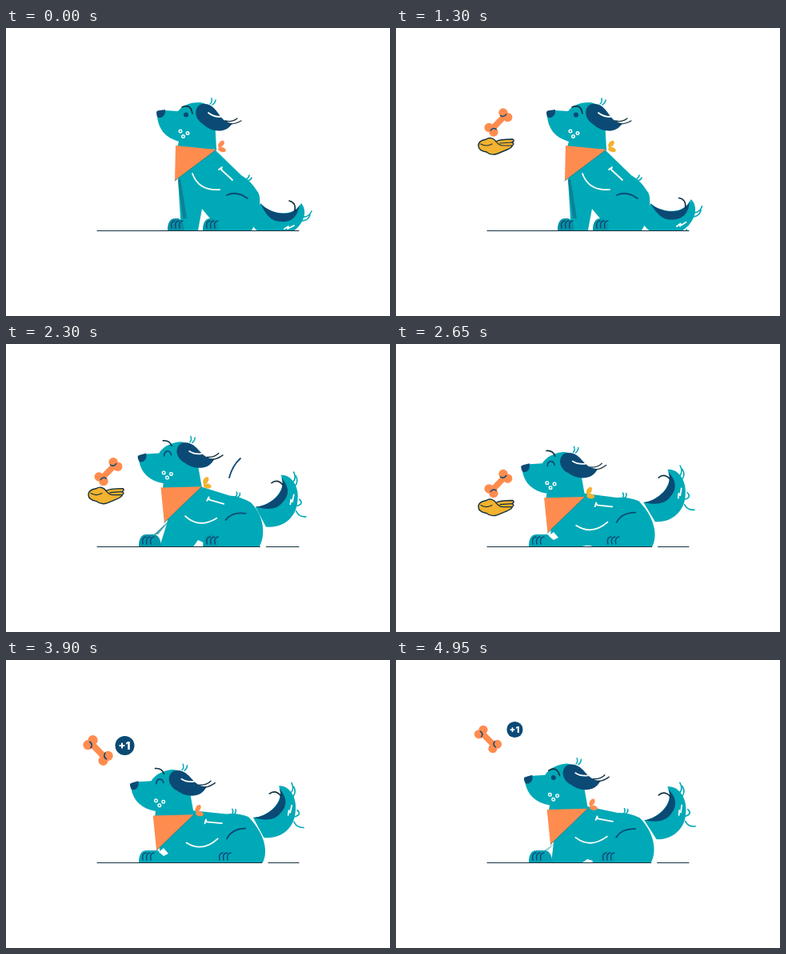
These frames come from a looping animation (480 px wide and 360 px high, 5 s). An HTML page with a canvas:

```html
<!DOCTYPE html>
<html lang="en">
<head>
<meta charset="utf-8">
<title>Dog and treat</title>
<style>
html, body { margin: 0; width: 100%; height: 100%; overflow: hidden; background: #fff; }
canvas { display: block; width: 480px; height: 360px; }
</style>
</head>
<body>
<canvas id="stage" width="480" height="360"></canvas>
<script>
const ctx = document.getElementById('stage').getContext('2d');
const LOOP = 5000, STEP = 50, GROUND = 253.5, DEG = Math.PI / 180;
const TEAL = '#00a9b7', SHADE = '#0b8197', NAVY = '#0b4a75', INK = '#12303f';
const ORANGE = '#ff8c4f', YELLOW = '#f3b22f', WHITE = '#fff';

const mix = (a, b, k) => a + (b - a) * k;
const mixPoint = (p, q, k) => [mix(p[0], q[0], k), mix(p[1], q[1], k)];
const span = (t, a, b) => Math.max(0, Math.min(1, (t - a) / (b - a)));
const smooth = k => k * k * (3 - 2 * k);
const backOut = k => 1 + 2.7 * (k - 1) ** 3 + 1.7 * (k - 1) ** 2;
const wave = (t, period) => (1 - Math.cos(t / period * 2 * Math.PI)) / 2;

function fill(color, shape) {
  ctx.fillStyle = color;
  ctx.fill(typeof shape === 'string' ? new Path2D(shape) : shape);
}

function stroke(color, width, shape) {
  ctx.strokeStyle = color;
  ctx.lineWidth = width;
  ctx.stroke(typeof shape === 'string' ? new Path2D(shape) : shape);
}

function ellipse(x, y, rx, ry = rx, angle = 0) {
  const path = new Path2D();
  path.ellipse(x, y, rx, ry, angle, 0, 2 * Math.PI);
  return path;
}

function polygon(points) {
  return new Path2D('M' + points.join('L') + 'Z');
}

function placed([x, y], angle, scale, draw) {
  ctx.save();
  ctx.translate(x, y);
  ctx.rotate(angle);
  ctx.scale(scale, scale);
  draw();
  ctx.restore();
}

// Where a point given relative to a rotated joint lands on the stage.
function jointPoint({ at, angle }, x, y) {
  const c = Math.cos(angle), s = Math.sin(angle);
  return [at[0] + x * c - y * s, at[1] + x * s + y * c];
}

// 0 = sitting, 1 = lying down.
function crouchAt(t) {
  return 1 - (1 - span(t, 1600, 2750)) ** 1.3 - .15 * span(t, 4400, 4950);
}

function poseAt(t) {
  const low = crouchAt(t);
  const sitWag = t < 1500 ? -10 * wave(t, 750) : 0;
  const lieWag = 6 * wave(t - 3050, 567) * span(t, 2300, 2750) * (1 - span(t, 4400, 4950));
  return {
    low,
    foot: mix(202, 166, smooth(span(low, .1, .65))),
    head: { at: mixPoint([193, 107], [160, 157], low), angle: -7 * Math.min(1, low * 4) * DEG },
    torso: { at: mixPoint([314, 204], [303, 196], low), angle: -38 * low * DEG },
    tail: {
      at: mixPoint([318, 219], [309, 197], low),
      angle: (-57 * Math.sin(low * Math.PI / 2) + sitWag + lieWag) * DEG
    }
  };
}

function drawTail({ tail }) {
  ctx.save();
  ctx.beginPath();
  ctx.rect(0, 0, 480, GROUND);
  ctx.clip();
  placed(tail.at, tail.angle, 1, () => {
    fill(TEAL, 'M0 0C11 13 40 20 51 0C60 10 54 28 38 37C22 48 0 44-11 26Z');
    fill(NAVY, 'M0 0C11 13 40 20 49 2C46 20 36 24 25 23C14 23 6 14 0 0Z');
    stroke(INK, 1.6, 'M43 10Q45-1 36-3');
    stroke(TEAL, 1.6, 'M53 17Q60 18 64 10M52 22Q59 22 62 15M28 43Q24 50 30 57M34 40Q41 45 42 37');
    stroke(WHITE, 1.8, 'M30 32L35 29L34 32L42 28');
  });
  ctx.restore();
}

function drawPaw(x, width, tone) {
  const paw = new Path2D(`M${x} 253C${x} 242 ${x + 4} 238 ${x + 10} 238H${x + width - 6}q7 2 8 15Z`);
  fill(TEAL, paw);
  ctx.globalAlpha = tone;
  fill(SHADE, paw);
  ctx.globalAlpha = 1;
  for (let toe = 5; toe < 16; toe += 5) stroke(NAVY, 1.5, `M${x + toe} 250q-2-8 4-9`);
}

function drawBody({ low, foot, head, torso }) {
  const scarfTip = jointPoint(head, 18, 83);
  const hip = jointPoint(torso, 0, 0);
  const back = jointPoint(torso, -20, -20);
  const gapTop = mix(226, 253, low);
  const outline = new Path2D('M' + [
    jointPoint(head, 30, 42),
    [scarfTip[0] + 4, scarfTip[1]],
    [foot + mix(17, 30, low), 253],
    [mix(240, 232, low), 253],
    [mix(245, 238, low), gapTop],
    [mix(255, 244, low), mix(238, 253, low)],
    [mix(255, 244, low), 253],
    [mix(307, 321, low), 253]
  ].join('L'));
  outline.bezierCurveTo(mix(314, 326, low), 244, mix(322, 328, low), mix(212, 222, low), ...hip);
  outline.quadraticCurveTo(...jointPoint(torso, -8, -13), ...back);
  outline.lineTo(...jointPoint(torso, -53, -52));
  outline.closePath();
  fill(TEAL, outline);

  const upright = 1 - span(low, .6, 1);
  ctx.globalAlpha = upright;
  fill(SHADE, polygon([
    [scarfTip[0] + 4, scarfTip[1]],
    [scarfTip[0] + 7, scarfTip[1] - 2],
    [foot + 24, 238], [foot + 19, 238]
  ]));
  ctx.globalAlpha = 1;
  drawPaw(foot, mix(19, 29, low), upright * .6);
  drawPaw(246 + 16 * span(low, .7, 1), 18, upright * .4);
  if (low > .9) fill(WHITE, 'M191 240L197 235L203 242L197 245Z');

  placed(torso.at, torso.angle, 1, () => {
    stroke(WHITE, 1.8, 'M-81-22Q-73 0-47-2M-48-27L-44-30L-45-27L-31-14');
    stroke(NAVY, 1.8, 'M-38 5Q-26-1-12 9');
    stroke(TEAL, 1.6, 'M-20-16Q-11-13-10-20M-18-14Q-8-12-7-17');
  });
}

function drawScarf(knotColor) {
  fill(ORANGE, 'M19 40L70 45L18 84Z');
  stroke(SHADE, .8, 'M70 45L18 84');
  fill(knotColor, ellipse(76, 38, 5, 3, -.9));
  fill(knotColor, ellipse(77, 45, 5, 3, .3));
}

function drawHead({ head }, happy, knotColor) {
  placed(head.at, head.angle, 1, () => {
    fill(TEAL, 'M-4-2Q-3-4 6-4L22-3C28-11 39-14 48-14C60-14 66-4 68 7L70 45L21 42L23 35C6 30-3 19-4 3Z');
    fill(NAVY, 'M-5-1Q-5-4-1-4L6-5Q7 2 1 5L-3 5Q-5 3-5-1Z');
    stroke(TEAL, 1.5, 'M62-12Q65-14 64-19M65-11Q69-14 69-17');
    fill(NAVY, 'M48-10C42-5 43 7 53 13C63 23 82 26 90 12C75 11 73-4 63-10C57-13 51-13 48-10Z');
    stroke(WHITE, 1.8, 'M60-1Q66 4 75 4');
    stroke(INK, 1.3, 'M87 13Q94 13 101 9M81 9Q90 11 96 6');
    if (happy) {
      stroke(NAVY, 1.7, 'M28 1C29-6 36-6 37 1');
      stroke(INK, 1.6, 'M29-18Q37-18 39-10');
    } else {
      fill(NAVY, ellipse(32, 1.5, 3));
      stroke(INK, 1.6, 'M27-8Q38-13 40 0');
    }
    for (const [x, y] of [[25, 22], [34, 24.5], [28.5, 28.5]]) stroke(WHITE, 1.4, ellipse(x, y, 1.8));
    drawScarf(knotColor);
  });
}

function drawGround({ low }) {
  const gap = mix(311, 320, low), width = 8 * Math.min(1, low * 5);
  stroke(INK, 1.2, `M114 ${GROUND}H${gap}M${gap + width} ${GROUND}H366`);
}

function drawBone() {
  ctx.fillStyle = ORANGE;
  ctx.fillRect(-12, -3.8, 24, 7.6);
  for (const side of [-1, 1]) {
    for (const lobe of [-4, 4]) fill(ORANGE, ellipse(12.8 * side, lobe, 5.7));
    stroke(NAVY, 1.5, `M${8 * side} ${-4 * side}Q${9 * side} ${side} ${14 * side} 0`);
  }
}

function drawTreat(t, { low }) {
  const size = t < 1000 ? backOut(span(t, 200, 500)) : 1 - span(t, 2900, 3125);
  if (t < 250 || size <= .02) return;
  placed([125, mix(137, 196, low)], 0, size, () => {
    placed([0, 11], 0, 1, () => {
      const hand = new Path2D('M-22-1C-22-7-16-8-12-9C-8-12-2-10 0-6C4-9 14-9 21-9Q24-7 20-5Q24-3 20-1Q21 1 14 4L2 9Q-6 12-12 7C-18 6-22 4-22-1Z');
      fill(YELLOW, hand);
      stroke(INK, 1.4, hand);
      stroke(INK, 1.2, 'M-19-3Q-12 1-5-3M0-6Q4-1 9-1L20-1M5-4L20-5');
    });
    placed([3, -19], -.8, 1, drawBone);
  });
}

function drawReward(t) {
  if (t < 3400) return;
  const pop = backOut(span(t, 3350, 3650)), lift = span(t, 3900, 4950);
  placed([115, mix(113, 99, lift)], .8, pop * mix(1.07, .98, lift), drawBone);
  placed([148.5, mix(107, 87, lift)], 0, pop * mix(1, .84, lift), () => {
    fill(NAVY, ellipse(0, 0, 12));
    ctx.fillStyle = WHITE;
    ctx.font = '900 13px Inter, "Open Sans", sans-serif';
    ctx.textAlign = 'center';
    ctx.textBaseline = 'middle';
    ctx.fillText('+1', -.5, .7);
  });
}

function drawSparks(t) {
  if (t < 2900 || t > 3450) return;
  const y = 116 - (t - 3050) * .04;
  stroke(INK, 1.2, ellipse(222.5, y, 2.2));
  stroke(NAVY, 1.6, `M211 ${y - 9}h4m-2-2v4`);
}

function render(t) {
  ctx.fillStyle = WHITE;
  ctx.fillRect(0, 0, 480, 360);
  ctx.lineCap = ctx.lineJoin = 'round';
  const pose = poseAt(t);
  drawTail(pose);
  drawBody(pose);
  drawHead(pose, t >= 2100 && t < 4700, t >= 300 && t < 2900 ? YELLOW : ORANGE);
  if (t >= 2200 && t <= 2400) stroke(NAVY, 1.8, 'M279 167Q283 152 293 143');
  drawGround(pose);
  drawTreat(t, pose);
  drawSparks(t);
  drawReward(t);
}

const start = performance.now();
function tick() {
  const t = (performance.now() - start) % LOOP;
  render(Math.floor(t / STEP) * STEP);
  requestAnimationFrame(tick);
}
tick();
</script>
</body>
</html>
```
